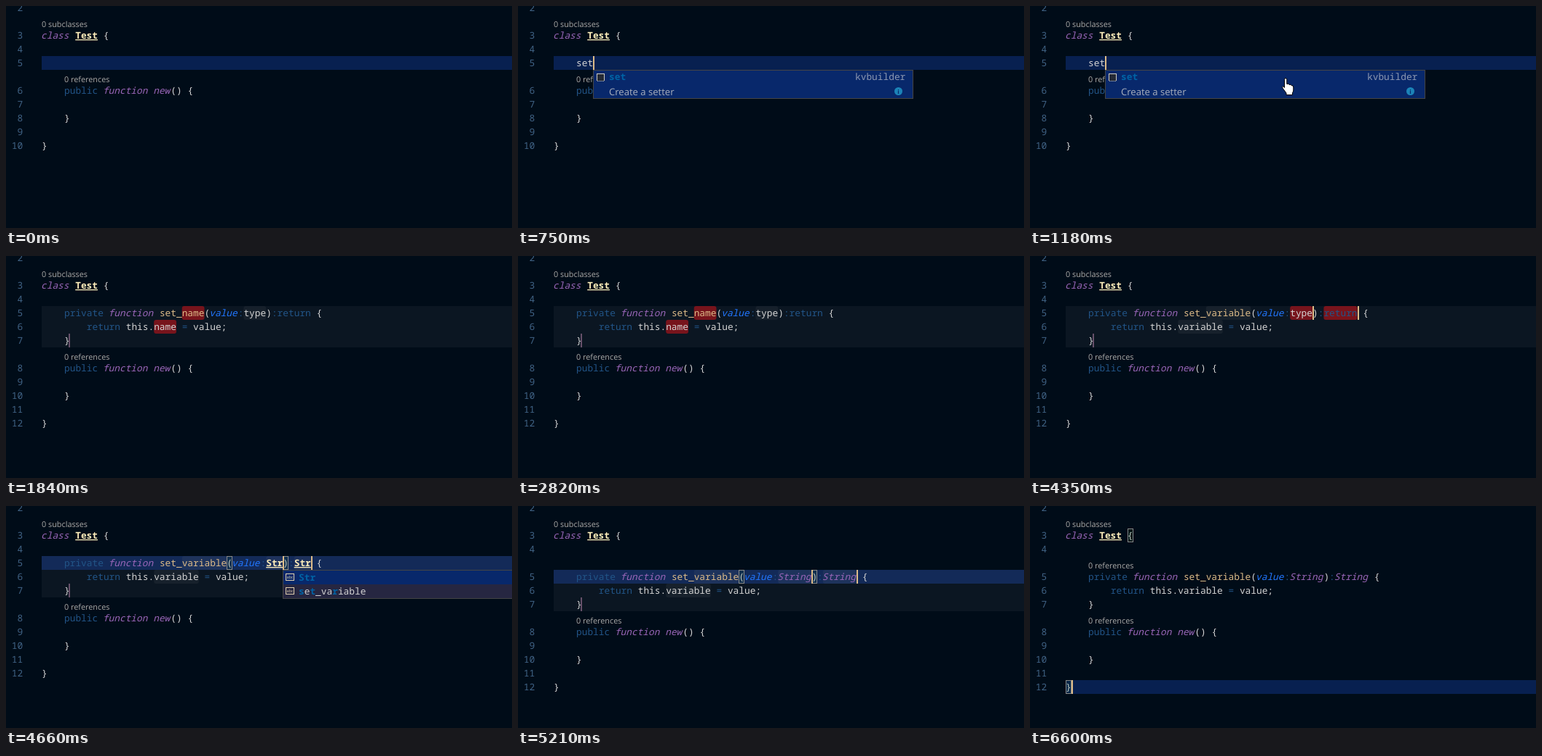
An HTML page that plays this animation: 695x306 px, repeating every 6.94 s.

```html
<!DOCTYPE html>
<html lang="en">
<head>
<meta charset="utf-8">
<title>Editor snippet</title>
<style>
  html, body { margin: 0; width: 100%; height: 100%; overflow: hidden; background: #000c18; }
  svg { display: block; width: 695px; height: 306px; }
  text { white-space: pre; fill: #d4d4d4; font: 12.83px "Noto Sans Mono", "DejaVu Sans Mono", monospace; text-rendering: geometricPrecision; }
  .num { fill: #406385; }
  .key { fill: #225588; }
  .store, .arg { fill: #9966b8; font-style: italic; transform: translateX(-1px); }
  .func { fill: #ddbb88; }
  .arg { fill: #2277ff; }
  .type { fill: #ffeebb; font-weight: 600; text-decoration: underline; }
  .hit { fill: #0063a5; font-weight: bold; }
  .detail { fill: #8d98b2; }
  .lens { fill: #acaaa8; font: 10.85px "Open Sans", "Noto Sans", sans-serif; }
  .doc { fill: #a9afbd; font: 13.1px "Open Sans", "Noto Sans", sans-serif; }
  .tiny { fill: #e0cfae; font: 5.5px "Open Sans", sans-serif; }
  .info { fill: #08286b; font: bold 8px "Open Sans", sans-serif; }
</style>
</head>
<body>
<svg id="stage" viewBox="0 0 695 306" xmlns="http://www.w3.org/2000/svg"></svg>
<script>
const LOOP = 6940, CW = 7.7, LH = 19, LEFT = 49, INDENT = 80;
const stage = document.getElementById('stage');

// Last value whose start time has passed.
const at = (t, steps) => steps.reduce((v, [start, next]) => t >= start ? next : v, null);
const col = n => INDENT + n * CW;

const rect = (x, y, w, h, fill, more = '') =>
  `<rect x="${x}" y="${y}" width="${w}" height="${h}" fill="${fill}" ${more}/>`;
const text = (x, y, s, cls = '', more = '') =>
  `<text x="${x.toFixed(2)}" y="${y}" class="${cls}" ${more}>${s}</text>`;

function runs(x, top, parts) {
  let out = '';
  for (const [s, cls] of parts) {
    out += text(x, top + 14, s, cls);
    x += s.length * CW;
  }
  return out;
}

const number = (n, top) => text(23.1 - String(n).length * CW, top + 14, n, 'num');
const lens = (x, top, s, opacity = 1) => text(x, top + 17, s, 'lens', `opacity="${opacity}"`);
const caret = (x, top) => rect(Math.round(x), top, 2, LH, '#ddbb88');
const bracket = (x, top) =>
  rect(Math.round(x) + .5, top + .5, 7, LH - 1, 'rgba(0,100,0,.1)', 'stroke="#888"');
const band = top => rect(LEFT, top, 695 - LEFT, LH, '#082050');
const mark = (x, top, len, fill) =>
  rect(x.toFixed(2), top, (len * CW).toFixed(2), LH, fill, 'rx="3"');
const field = (x, top, len, selected) =>
  (selected ? mark(x, top, len, '#770811') : '') + mark(x, top, len, 'rgba(124,124,124,.1)');

function popup(x, top, height, rows) {
  x = Math.round(x);
  let out = rect(x + .5, top + .5, 439, height - 1, '#262641', 'stroke="#454545"');
  return out + rows(x, top);
}

function wordIcon(x, y) {
  return rect(x + .5, y + .5, 11, 9, 'none', 'stroke="#e0cfae"') + text(x + 1.4, y + 7, 'abc', 'tiny');
}

function wordPopup(x, top, items) {
  return popup(x, top, items.length * LH + 2, (px, py) =>
    rect(px + 1, py + 1, 438, LH, '#08286b') +
    items.map((parts, i) =>
      wordIcon(px + 4, py + 5 + i * LH) + runs(px + 22, py + 1 + i * LH, parts)
    ).join(''));
}

function snippetPopup(x, top, open) {
  return popup(x, top, open ? 40 : 21, (px, py) => {
    let out = rect(px + 1, py + 1, 438, open ? 38 : LH, '#08286b');
    out += rect(px + 5.5, py + 5.5, 10, 10, '#252a35', 'stroke="#d0cdc4"');
    out += `<path d="M${px + 5} ${py + 15.5}h11" stroke="#08286b" stroke-dasharray="1 1"/>`;
    out += runs(px + 22, py, [['set', 'hit']]) + runs(px + 360, py, [['kvbuilder', 'detail']]);
    if (open) {
      out += text(px + 22, py + 35, 'Create a setter', 'doc');
      out += `<circle cx="${px + 419.5}" cy="${py + 29.5}" r="5.5" fill="#1c84b8"/>`;
      out += text(px + 418.3, py + 32.5, 'i', 'info');
    }
    return out;
  });
}

function hand(x, y) {
  return `<path transform="translate(${x} ${y})" fill="#fff" stroke="#000" stroke-linejoin="round"
    d="M3.5 2.5Q3.5 .5 5 .5T6.8 2.5V8.5Q9.5 7.5 10 9.5Q12.5 8.5 13 10.5Q15.8 10 15.8 13V17
    Q15.8 19 14.5 20.5V23.5H6V21L1.2 14.5Q0 12.5 1.2 11.8Q2.3 11.4 3.5 13.5Z"/>`;
}

function tail(top, first) {
  let out = lens(INDENT, top, '0 references');
  for (let i = 0; i < 5; i++) out += number(first + i, top + LH * (i + 1));
  out += runs(INDENT, top + LH, [['public ', 'key'], ['function ', 'store'], ['new', 'store'], ['() {', '']]);
  return out + runs(INDENT, top + LH * 3, [['}', '']]) + runs(LEFT, top + LH * 5, [['}', '']]);
}

function opening(t) {
  const top = 69;
  const typed = at(t, [[0, ''], [210, 's'], [320, 'se'], [430, 'set']]);
  const end = col(typed.length);
  let out = band(top) + number(5, top) + tail(88, 6) + runs(INDENT, top, [[typed, '']]);
  if (t >= 100) out += caret(end, top);
  if (t >= 640) out += snippetPopup(end, 88, t >= 750);
  if (t >= 860) out += hand(346, at(t, [[860, 142], [960, 126], [1070, 110], [1180, 99]]));
  return out;
}

function filling(t) {
  const top = t < 5210 ? 69 : 88, next = top + LH, last = next + LH;
  const name = at(t, [[0, 'name'], [3270, 'v'], [3380, 'va'], [3480, 'var'], [3690, 'varia'],
    [3910, 'variab'], [4020, 'variabl'], [4130, 'variable']]);
  const typed = at(t, [[0, ''], [4460, 'S'], [4560, 'St'], [4660, 'Str'], [4770, 'Stri'], [4880, 'String']]);
  const type = typed || 'type', result = typed || 'return';
  const typeStyle = typed === 'String' ? 'store' : 'type';

  const nameAt = col(21), nameEnd = col(21 + name.length);
  const bodyName = col(16), bodyEnd = col(16 + name.length);
  const typeAt = nameEnd + 7 * CW, typeEnd = typeAt + type.length * CW;
  const resultAt = typeEnd + 2 * CW, resultEnd = resultAt + result.length * CW;

  const active = t < 6390;
  const naming = t < 4350;
  const selecting = t < 3270 || (t >= 4350 && t < 4460);
  const caretOn = at(t, [[0, true], [1840, false], [2390, true], [2820, false], [3270, true],
    [5750, false], [6170, true]]);
  let out = '';

  if (active) {
    if (!selecting) out += band(top);
    out += rect(LEFT, top, 695 - LEFT, LH * 3, 'rgba(255,255,255,.043)');
    const nameSelected = selecting && naming, typeSelected = selecting && !naming;
    out += field(nameAt, top, name.length, nameSelected);
    out += field(bodyName, next, name.length, nameSelected);
    out += field(typeAt, top, type.length, typeSelected);
    if (!naming) out += field(resultAt, top, result.length, typeSelected);
    out += rect(86, last, 2, LH, '#66506a');
  } else {
    out += band(240);
  }

  [top, next, last].forEach((y, i) => { out += number(5 + i, y); });
  out += runs(INDENT, top, [['private ', 'key'], ['function ', 'store'], ['set_' + name, 'func'], ['(', ''],
    ['value', 'arg'], [':', 'key'], [type, typed ? typeStyle : ''], [')', ''], [':', 'key'],
    [result, typed ? typeStyle : 'key'], [' {', '']]);
  out += runs(col(4), next, [['return ', 'key'], ['this.' + name, ''], [' = ', 'key'], ['value;', '']]);
  out += runs(INDENT, last, [['}', '']]) + tail(last + LH, 8);

  if (t >= 5750) {
    const shown = Math.min(5, Math.floor((t - 5750) / 105) + 1) / 5;
    out += lens(INDENT, 69, '0 references', shown);
  }

  if (active) {
    if (!selecting) out += bracket(nameEnd, top) + bracket(typeEnd, top);
    if (caretOn) {
      out += naming
        ? caret(nameEnd, top) + caret(bodyEnd, next)
        : caret(typeEnd, top) + caret(resultEnd, top);
    }
  } else {
    if (t >= 6500) out += caret(LEFT + CW, 240);
    if (t >= 6600) out += bracket(LEFT, 240) + bracket(LEFT + 11 * CW, 31);
  }

  if (t >= 3690 && naming) out += wordPopup(nameEnd, next, [[['set_' + name, 'hit']]]);
  if (t >= 4660 && t < 4880) {
    const i = typed === 'Stri' ? 'hit' : '';
    out += wordPopup(typeEnd, next, [[[typed, 'hit']],
      [['s', 'hit'], ['e', ''], ['t', 'hit'], ['_va', ''], ['r', 'hit'], ['i', i], ['able', '']]]);
  }
  return out;
}

function scene(t) {
  return rect(0, 0, 695, 306, '#000c18') +
    number(2, -7) + number(3, 31) + number(4, 50) +
    lens(LEFT, 12, '0 subclasses') +
    runs(LEFT, 31, [['class ', 'store'], ['Test', 'type'], [' {', '']]) +
    (t < 1400 ? opening(t) : filling(t));
}

let shown = '';
function draw(now) {
  const markup = scene(now % LOOP);
  if (markup !== shown) stage.innerHTML = shown = markup;
}

const began = performance.now();
function tick() {
  draw(performance.now() - began);
  requestAnimationFrame(tick);
}
tick();
</script>
</body>
</html>
```
